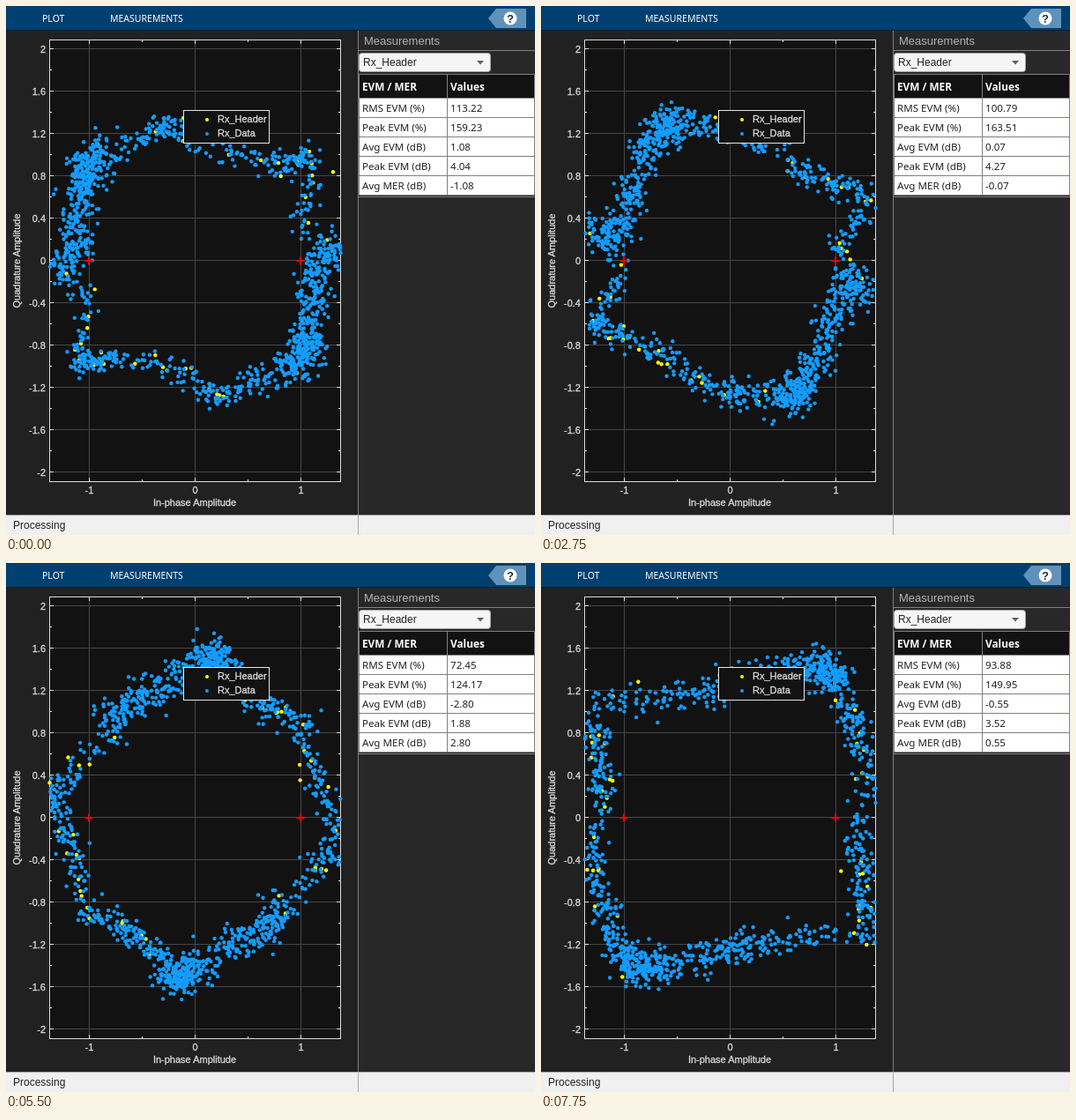
Write an HTML page with a canvas that moves like this. It is 600x600 px and loops after 8000 ms.

```html
<!DOCTYPE html>
<html lang="en">
<head>
<meta charset="utf-8">
<title>Constellation</title>
<style>
html, body { margin: 0; width: 100%; height: 100%; overflow: hidden; background: #212121; }
svg, canvas { position: absolute; left: 0; top: 0; width: 600px; height: 600px; }
text { font-family: "Liberation Sans", Arial, sans-serif; }
.axis text, .legend text { font-size: 11px; fill: #dcdcdc; stroke: #dcdcdc; stroke-width: .3; }
.cell { font: 11.6px "Noto Sans", "Open Sans", sans-serif; fill: #212121; }
.head { font: bold 11.8px "Noto Sans", "Open Sans", sans-serif; fill: #fff; }
.tab { font: 10.5px "Noto Sans", "Open Sans", sans-serif; fill: #fff; }
</style>
</head>
<body>
<svg id="base" viewBox="0 0 600 600">
  <rect width="600" height="600" fill="#212121"/>
  <rect width="600" height="27" fill="#004070"/>
  <rect y="27" width="600" height="1" fill="#10202c"/>
  <text class="tab" x="41" y="18">PLOT</text>
  <text class="tab" x="118" y="18">MEASUREMENTS</text>
  <path d="M547 14L556 3H590V25H556Z" fill="#5f92bb"/>
  <circle cx="572" cy="14" r="7.5" fill="#fff"/>
  <text x="572" y="18.5" font-size="13" font-weight="bold" text-anchor="middle" fill="#1c2f40">?</text>

  <rect x="400" y="28" width="200" height="549" fill="#282828"/>
  <rect x="399" y="28" width="1" height="549" fill="#808080"/>
  <text x="406" y="44" font-size="13" fill="#b4b4b4">Measurements</text>
  <rect x="400" y="50" width="200" height="1" fill="#808080"/>
  <rect x="400.5" y="53.5" width="149" height="21" rx="3" fill="#f5f5f5" stroke="#a0a0a0"/>
  <text x="405" y="68" font-size="12" fill="#212121">Rx_Header</text>
  <path d="M534 62H542L538 66.5Z" fill="#616161"/>
  <g id="table"></g>
  <rect x="400" y="216" width="200" height="1" fill="#808080"/>

  <rect y="577" width="600" height="23" fill="#f0f0f0"/>
  <path d="M0 577.5H600M399.5 577V600" stroke="#a8a8a8"/>
  <text x="8" y="593" font-size="12" fill="#212121">Processing</text>

  <rect x="49" y="38" width="331" height="502" fill="#121212"/>
  <g id="axis" class="axis">
    <text x="214" y="567" text-anchor="middle">In-phase Amplitude</text>
    <text transform="translate(16 289) rotate(-90)" text-anchor="middle">Quadrature Amplitude</text>
  </g>
</svg>
<canvas id="dots" width="600" height="600"></canvas>
<svg viewBox="0 0 600 600">
  <path d="M89.5 289h9m-4.5 -4.5v9M329.5 289h9m-4.5 -4.5v9" stroke="#f00" stroke-width="2"/>
  <g class="legend">
    <rect x="201.5" y="118.5" width="97" height="37" fill="#121212" stroke="#e6e6e6"/>
    <circle cx="228" cy="129" r="2" fill="#ff0"/>
    <circle cx="228" cy="145" r="2" fill="#149cff"/>
    <text x="240" y="132">Rx_Header</text>
    <text x="240" y="148">Rx_Data</text>
  </g>
</svg>
<script>
const STEP = 250, STEPS = 32;
const CX = 214.5, CY = 289, UNIT = 120.2, LIMIT = 1.375;
const TAU = Math.PI * 2;
const $ = id => document.getElementById(id);

function add(parent, tag, attrs, text) {
  const el = document.createElementNS('http://www.w3.org/2000/svg', tag);
  for (const k in attrs) el.setAttribute(k, attrs[k]);
  if (text !== undefined) el.textContent = text;
  parent.appendChild(el);
  return el;
}

// Axes
const axis = $('axis');
let grid = '', ticks = '';
for (let i = -10; i <= 10; i++) {
  const y = Math.round(CY - i * 0.2 * UNIT) - 0.5, major = i % 2 === 0, len = major ? 5 : 3;
  ticks += `M49 ${y}h${len}M380 ${y}h${-len}`;
  if (!major) continue;
  grid += `M50 ${y}H379`;
  add(axis, 'text', { x: 45, y: y + 4, 'text-anchor': 'end' }, +(i * 0.2).toFixed(1));
}
for (let i = -2; i <= 2; i++) {
  const x = Math.floor(CX + i * 0.5 * UNIT) + 0.5, major = i % 2 === 0, len = major ? 5 : 3;
  ticks += `M${x} 38v${len}M${x} 540v${-len}`;
  if (!major) continue;
  grid += `M${x} 39V539`;
  add(axis, 'text', { x, y: 553, 'text-anchor': 'middle' }, i / 2);
}
add(axis, 'path', { d: grid, stroke: '#474747' });
add(axis, 'path', { d: ticks, stroke: '#dcdcdc' });
add(axis, 'rect', { x: 49.5, y: 38.5, width: 330, height: 501, fill: 'none', stroke: '#dcdcdc' });

// Measurement table
const table = $('table');
add(table, 'rect', { x: 401, y: 78, width: 198, height: 26, fill: '#121212' });
add(table, 'rect', { x: 401, y: 104, width: 198, height: 110, fill: '#fff' });
add(table, 'text', { class: 'head', x: 404, y: 96 }, 'EVM / MER');
add(table, 'text', { class: 'head', x: 504, y: 96 }, 'Values');
const cells = ['RMS EVM (%)', 'Peak EVM (%)', 'Avg EVM (dB)', 'Peak EVM (dB)', 'Avg MER (dB)'].map((name, i) => {
  const y = 120 + i * 22;
  add(table, 'path', { d: `M401 ${y - 15.5}H599`, stroke: '#808080' });
  add(table, 'text', { class: 'cell', x: 404, y }, name);
  return add(table, 'text', { class: 'cell', x: 504, y });
});
add(table, 'path', { d: 'M400.5 77.5H599.5V214.5H400.5ZM500.5 78V214', fill: 'none', stroke: '#808080' });

// Readings over time, in seconds
const TIMES = [0, 1, 2, 3.25, 4.5, 6.25, 7.75];
const RMS = [113.22, 109.31, 106.44, 95.79, 79, 72.41, 93.88];
const PEAK = [159.23, 160.94, 165.81, 159.56, 140.49, 118.86, 149.95];

// Centre line of half the ring at a few times; the other half is point-symmetric
const POSE_TIMES = [0, 2, 4.5, 6.25, 7.75];
const POSES = [
  [-1.35,-.1, -1.12,.05, -1.09,.5, -1.02,.93, -.6,1.12, -.2,1.3, .2,1.03, .75,.9, 1.12,1, .98,.35],
  [-1.36,.2, -1.12,.05, -1,.6, -.78,1.2, -.35,1.2, 0,1.28, .45,.95, .78,.85, 1.28,.78, 1,.2],
  [-1.05,.58, -.95,.75, -.55,1.2, -.22,1.5, .05,1.35, .45,1.15, .8,.9, 1.1,.53, 1.33,.05, 1.05,-.25],
  [-.65,1, -.5,1.2, .05,1.32, .48,1.52, .65,1.2, .85,.95, 1.18,.85, 1.12,.3, 1.36,-.3, 1.2,-.72],
  [-.9,1.1, -.2,1.18, .4,1.38, .92,1.42, 1.08,1.15, 1.2,.8, 1.3,.4, 1.2,-.2, 1.25,-.66, 1.3,-1.12]
];
// Dots per segment
const DATA = [60, 110, 150, 90, 55, 40, 35, 55, 45, 18];
const HEADER = [0, 0, 0, 1, 2, 4, 4, 5, 4, 2];

// Cubic Hermite through the values
function sample(times, vals, t) {
  const last = times.length - 1;
  let i = 0;
  while (i < last - 1 && t >= times[i + 1]) i++;
  const slope = j => {
    const a = Math.max(j - 1, 0), b = Math.min(j + 1, last);
    return (vals[b] - vals[a]) / (times[b] - times[a]);
  };
  const h = times[i + 1] - times[i], u = (t - times[i]) / h, v = 1 - u;
  return v * v * (1 + 2 * u) * vals[i] + u * u * (3 - 2 * u) * vals[i + 1]
    + h * u * v * (v * slope(i) - u * slope(i + 1));
}

function random(seed) {
  return () => {
    seed = (seed + 0x6D2B79F5) | 0;
    let x = Math.imul(seed ^ seed >>> 15, 1 | seed);
    x = x + Math.imul(x ^ x >>> 7, 61 | x) ^ x;
    return ((x ^ x >>> 14) >>> 0) / 4294967296;
  };
}

const ctx = $('dots').getContext('2d');

function scatter(nodes, counts, color, rnd) {
  ctx.fillStyle = color;
  for (const side of [1, -1]) counts.forEach((count, k) => {
    const [ax, ay] = nodes[k], [bx, by] = nodes[k + 1];
    const spread = k < 4 ? .083 : .062;
    for (let n = 0; n < count; n++) {
      let u = rnd();
      if (k === 2) u = Math.sqrt(u);       // crowd around node 3
      if (k === 3) u = 1 - Math.sqrt(u);
      const r = spread * Math.sqrt(-2 * Math.log(1 - rnd())), a = rnd() * TAU;
      const x = side * (ax + (bx - ax) * u + r * Math.cos(a));
      const y = side * (ay + (by - ay) * u + r * Math.sin(a));
      if (Math.abs(x) > LIMIT) continue;
      ctx.beginPath();
      ctx.arc(CX + x * UNIT, CY - y * UNIT, 2.2, 0, TAU);
      ctx.fill();
    }
  });
}

function draw(step) {
  const t = step * STEP / 1000, rnd = random(step * 977 + 5);
  const coord = i => sample(POSE_TIMES, POSES.map(p => p[i]), t);
  const nodes = DATA.map((_, k) => [coord(2 * k), coord(2 * k + 1)]);
  nodes.push(nodes[0].map(v => -v));
  ctx.clearRect(0, 0, 600, 600);
  scatter(nodes, HEADER, '#ff0', rnd);
  scatter(nodes, DATA, '#149cff', rnd);

  const rms = sample(TIMES, RMS, t), peak = sample(TIMES, PEAK, t);
  const dB = v => 20 * Math.log10(v / 100);
  [rms, peak, dB(rms), dB(peak), -dB(rms)].forEach((v, i) => cells[i].textContent = v.toFixed(2));
}

let shown = -1;
function tick() {
  const step = Math.floor(performance.now() / STEP) % STEPS;
  if (step !== shown) draw(shown = step);
  requestAnimationFrame(tick);
}
tick();
</script>
</body>
</html>
```
